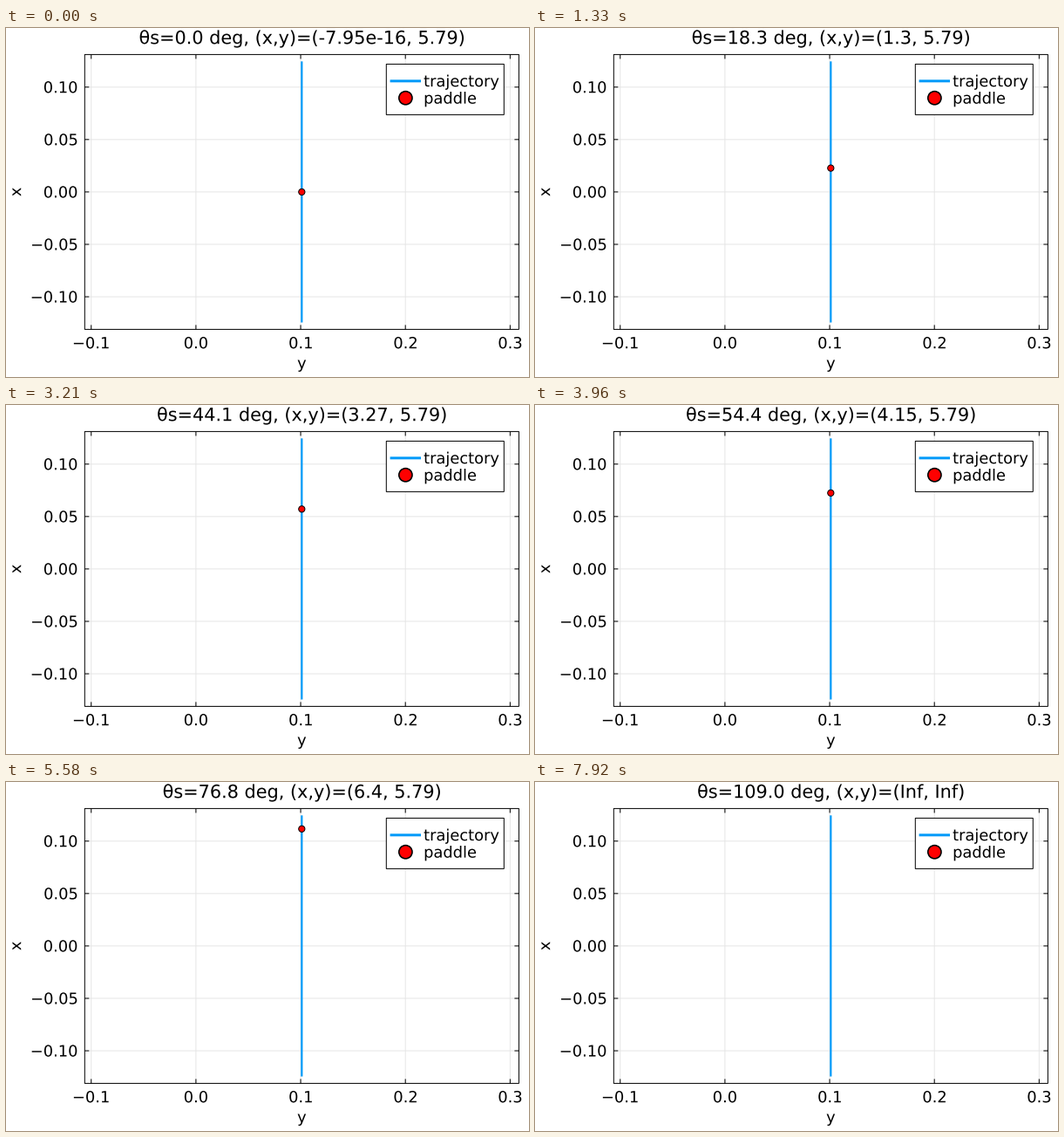
These frames come from a looping animation (600x400 px, 8000 ms). A matplotlib script:

```python
import math

import matplotlib.pyplot as plt
from matplotlib.animation import FuncAnimation
from matplotlib.patches import Circle, PathPatch, Rectangle
from matplotlib.textpath import TextPath
from matplotlib.transforms import Affine2D

W, H, DPI = 600, 400, 100
STEPS, LOOP_MS = 192, 8000
FRAMES = 2 * STEPS                      # half-step frames
LEFT, RIGHT, TOP, BOTTOM = 90.3, 588.4, 30.4, 345.4
MID = (LEFT + RIGHT) / 2
X0, Y0, SCALE = 217.9, 187.9, 1201.5    # pixel origin, pixels per radian
STEP = 0.01                             # servo angle per step, rad
GAIN = 0.14093
LAST_VALID = 144
PADDLE_Y = math.radians(5.79)
BLUE = "#009af9"
SMALL, LARGE = 17.85, 20.8              # text sizes in pixels

plt.rcParams["font.family"] = "DejaVu Sans"


def pt(px):
    return px * 72 / DPI


def sig3(value):
    return str(float(f"{value:.3g}"))


def paddle_x(k):
    return GAIN * math.tan(k * STEP / 2)


def to_px(y, x):
    return X0 + y * SCALE, Y0 - x * SCALE


fig = plt.figure(figsize=(W / DPI, H / DPI), dpi=DPI, facecolor="white")
ax = fig.add_axes([0, 0, 1, 1])
ax.set_xlim(0, W)
ax.set_ylim(H, 0)
ax.axis("off")


def line(xs, ys, color="black", width=1.0, cap="butt", **kw):
    ax.plot(xs, ys, color=color, lw=pt(width), solid_capstyle=cap,
            snap=False, **kw)


def box(x, y, w, h, fill, z):
    ax.add_patch(Rectangle((x, y), w, h, fc=fill, ec="black", lw=pt(1),
                           snap=False, zorder=z))


def dot(x, y, r, edge, z):
    return ax.add_patch(Circle((x, y), r, fc="red", ec="black",
                               lw=pt(edge), zorder=z))


def text_path(x, y, text, size=SMALL, align="center", angle=0):
    path = TextPath((0, 0), text, size=size)
    ink = path.get_extents()
    shift = {"left": 0, "center": -(ink.x0 + ink.x1) / 2, "right": -ink.x1}
    move = Affine2D().translate(shift[align], 0).scale(1, -1)
    return move.rotate_deg(angle).translate(x, y).transform_path(path)


def label(*args, z=4, **kw):
    return ax.add_patch(PathPatch(text_path(*args, **kw), fc="black", lw=0,
                                  snap=False, zorder=z))


def tick_text(value, digits):
    return f"{value:.{digits}f}".replace("-", "\u2212")


def draw_axes():
    tick = 5
    for i in range(-1, 4):
        x, _ = to_px(i / 10, 0)
        line([x, x], [TOP, BOTTOM], "#e6e6e6", zorder=1)
        line([x, x], [BOTTOM, BOTTOM - tick], zorder=3)
        line([x, x], [TOP, TOP + tick], zorder=3)
        label(x, 367.2, tick_text(i / 10, 1))
    for i in range(-2, 3):
        _, y = to_px(0, i / 20)
        line([LEFT, RIGHT], [y, y], "#e6e6e6", zorder=1)
        line([LEFT, LEFT + tick], [y, y], zorder=3)
        line([RIGHT, RIGHT - tick], [y, y], zorder=3)
        label(81.3, y + 6.5, tick_text(i / 20, 2), align="right")
    box(LEFT, TOP, RIGHT - LEFT, BOTTOM - TOP, "none", 3)
    label(MID, 390.2, "y")
    label(17.2, Y0, "x", angle=-90)


def draw_legend():
    box(436.3, 41.4, 135, 58, "white", 6)
    line([440.6, 476], [60.8, 60.8], BLUE, 3, zorder=7)
    dot(458.4, 80.2, 7.6, 1.6, 7)
    label(479.1, 67.1, "trajectory", align="left", z=7)
    label(479.1, 86.6, "paddle", align="left", z=7)


draw_axes()
reach = paddle_x(LAST_VALID)
ends = [to_px(PADDLE_Y, s * reach) for s in (-1, 1)]
line(*zip(*ends), BLUE, 2.2, "projecting", zorder=4)
draw_legend()
paddle = dot(*to_px(PADDLE_Y, 0), 3.6, 1, 5)
title = label(MID, 18.2, "0", size=LARGE)


def update(i):
    # each step is shown centred on its own time
    k = min((i + 1) // 2, STEPS - 1)
    valid = k <= LAST_VALID
    paddle.set_visible(valid)
    if valid:
        x = paddle_x(k)
        paddle.center = to_px(PADDLE_Y, x)
        shown = sig3(math.degrees(x)) if k else "-7.95e-16"
        pos = f"{shown}, {sig3(math.degrees(PADDLE_Y))}"
    else:
        pos = "Inf, Inf"
    text = f"\u03b8s={sig3(math.degrees(k * STEP))} deg, (x,y)=({pos})"
    title.set_path(text_path(MID, 18.2, text, size=LARGE))
    return paddle, title


anim = FuncAnimation(fig, update, frames=FRAMES, interval=LOOP_MS / FRAMES,
                     init_func=lambda: update(0), repeat=True, repeat_delay=0)
plt.show()
```
